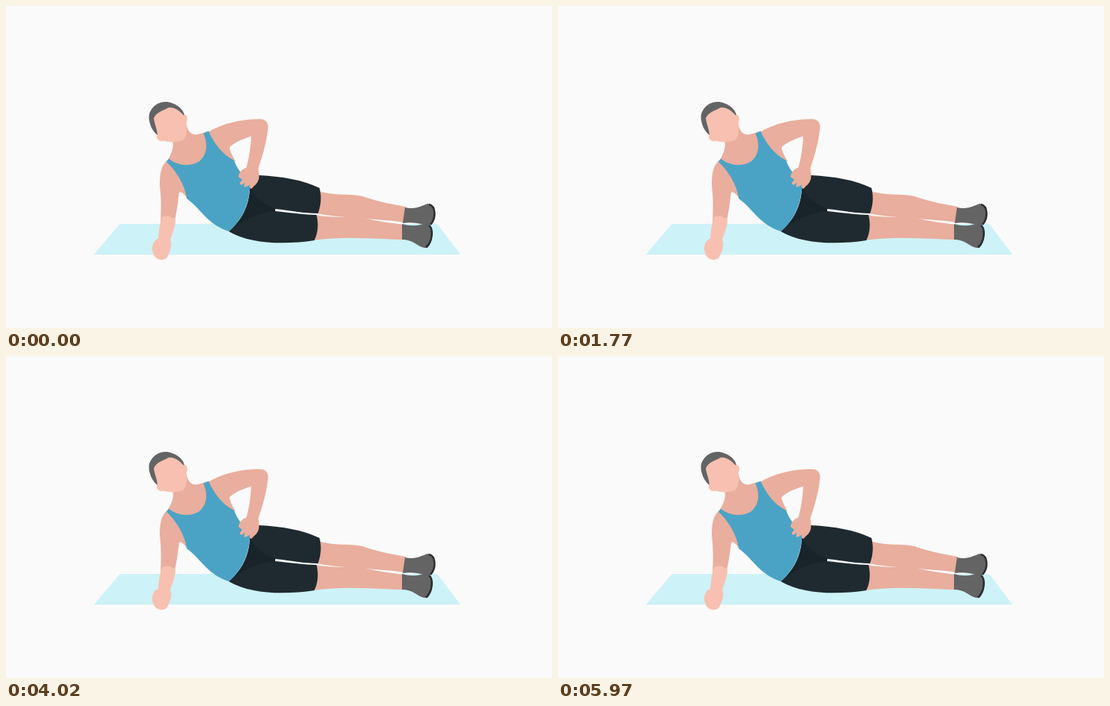
An HTML page for the animation above (6 s loop, 728 by 430 pixels).

```html
<!DOCTYPE html>
<html lang="en">
<head>
<meta charset="utf-8">
<title>Side plank</title>
<style>
html, body { margin: 0; width: 100%; height: 100%; overflow: hidden; background: #fafafa; }
svg { display: block; width: 728px; height: 430px; }
</style>
</head>
<body>
<svg viewBox="0 0 728 430">
  <path fill="#cdf2f7" d="M152,291H575L606,332H117Z"/>
  <g id="body"></g>
  <path fill="#f7c0b0" d="M208,282C214,279 221,281 226,285C226,295 221,305 219,312C222,320 219,327 216,333C214,339 208,340 203,338C198,336 195,330 195,323C196,315 199,312 203,311C204,300 205,290 208,282Z"/>
  <g id="head">
    <path fill="#636465" d="M204,174C194,168 189,153 191,144C196,130 210,125 222,130C231,133 238,140 238,148L220,165Z"/>
    <path fill="#f7c0b0" d="M197,150C200,142 209,140 216,136C224,134 231,140 237,146C242,143 243,152 240,157C242,166 241,175 236,179C226,183 216,182 211,180C205,182 200,178 201,173C204,171 198,158 197,150Z"/>
  </g>
</svg>
<script>
const SKIN = '#e9ae9d', VEST = '#4aa3c5', SHORTS = '#1f2a30', FOLD = '#19232a', SHOE = '#646465', SOLE = '#2b2d30';
const LOOP = 6000, REP = 2030, MOVE = 585, RISE = 100, FALL = 1106;

// Each part: colour, resting outline, raised outline, optional stroke width.
const parts = [
  // legs
  [SKIN,
   'M416,247C440,254 455,250 475,254C495,261 515,265 533,268L531,289C500,284 450,284 414,277Z',
   'M433,221C455,232 470,231 486,238C505,248 523,257 542,265L538,282C505,272 460,263 425,248Z'],
  [SKIN,
   'M412,279C440,284 460,280 480,284C500,288 515,290 530,292L528,312C490,311 450,307 409,313Z',
   'M422,252C450,262 470,262 490,270C508,280 522,284 535,287L530,305C495,298 455,294 416,283Z'],
  // shoes
  [SHOE,
   'M532,269C543,272 552,268 562,264C572,265 574,282 567,292C556,294 548,287 529,290Z',
   'M541,265C552,270 562,268 571,266C583,267 583,284 572,294C560,295 552,285 537,283Z'],
  [SOLE, 'M564,265C573,267 574,283 566,292', 'M574,266C582,269 582,285 572,293', 2.5],
  [SHOE,
   'M528,291C541,295 552,293 560,290C571,291 571,314 562,323C549,324 546,312 528,312Z',
   'M533,286C545,293 555,290 565,291C575,294 573,314 563,323C550,323 548,309 531,305Z'],
  [SOLE, 'M564,293C570,297 569,315 560,322', 'M569,294C573,301 570,315 562,322', 2.5],
  // shorts
  [SHORTS,
   'M297,301C318,284 327,258 325,232L337,226C370,228 395,232 418,243C421,255 420,266 416,277C398,277 378,273 359,271L359,274C380,276 400,279 414,279C417,290 416,304 411,313C372,319 325,318 297,301Z',
   'M308,254C321,238 331,208 331,184L337,183C372,186 404,199 436,217C437,229 433,241 427,249C408,247 390,240 373,234L373,237C390,246 408,251 424,253C426,264 423,277 417,285C378,284 340,272 308,254Z'],
  [FOLD,
   'M325,243Q340,265 359,271L358,274Q325,278 297,301C318,284 327,258 325,243Z',
   'M331,195Q345,222 373,234L372,237Q335,240 308,254C321,238 330,210 331,195Z'],
  // neck and chest
  [SKIN,
   'M222,178C224,188 222,195 216,205L240,225L270,195L268,168C260,170 252,174 247,170C242,166 241,161 240,155Z',
   'M186,195C193,197 203,196 203,211L222,222L242,190L221,154C217,160 215,167 210,168C204,168 199,166 192,158Z'],
  // supporting arm
  [SKIN,
   'M216,205C207,213 205,222 205,240C207,255 207,270 206,290L224,290C228,275 229,262 231,249C234,247 239,253 243,259L245,240L230,210Z',
   'M202,210C200,222 202,235 204,250C206,262 206,272 205,290L224,290C227,275 229,258 229,244C232,239 240,240 252,240L245,230L215,215Z'],
  // bent arm
  [SKIN,
   'M268,169C290,156 315,151 338,151C347,151 351,157 349,166C347,185 341,203 336,218L320,217C324,205 326,190 327,174C314,178 303,183 298,189C299,196 303,201 306,208C290,204 275,186 268,169Z',
   'M220,156C230,137 262,109 288,105C295,103 299,106 303,112C314,130 322,150 330,173L315,177C308,160 298,143 289,128C277,137 266,145 260,153C264,158 270,160 277,164C258,166 238,160 220,156Z'],
  [VEST,
   'M217,204C231,215 249,214 258,207C269,198 269,182 263,170L270,167C277,183 289,199 304,206C308,216 312,224 325,232C327,258 316,286 297,301C268,291 262,273 241,257C239,240 227,220 214,208Z',
   'M203,212C222,213 233,207 236,193C239,180 231,166 218,160L220,154C240,160 258,165 276,163C288,173 306,179 331,184C332,208 322,238 309,254C290,242 272,240 250,240C237,236 222,222 202,218Z'],
  // hand on hip
  [SKIN,
   'M320,216C314,218 311,222 310,228L315,232C311,236 311,238 314,239L319,236C316,241 318,243 321,241L325,239C324,244 327,246 330,241C338,235 339,228 336,216Z',
   'M315,176C310,176 308,178 307,182L317,182C314,190 315,197 317,198L321,191C319,197 322,201 324,200L328,192C327,199 331,199 333,193C341,188 339,181 330,172Z']
];

const body = document.getElementById('body'), head = document.getElementById('head');
const number = /\d+/g;

const shapes = parts.map(([color, low, high, width]) => {
  const path = document.createElementNS('http://www.w3.org/2000/svg', 'path');
  path.setAttribute('fill', width ? 'none' : color);
  if (width) {
    path.setAttribute('stroke', color);
    path.setAttribute('stroke-width', width);
  }
  body.append(path);
  return { path, low, high: high.match(number) };
});

function ease(u) {
  u = Math.min(1, Math.max(0, u));
  return u * u * (3 - 2 * u);
}

function draw() {
  const phase = performance.now() % LOOP % REP;
  const p = ease((phase - RISE) / MOVE) - ease((phase - FALL) / MOVE);
  for (const { path, low, high } of shapes) {
    let i = 0;
    path.setAttribute('d', low.replace(number, n => (+n + (high[i++] - n) * p).toFixed(2)));
  }
  head.setAttribute('transform', `translate(${-37 * p} ${12 * p}) rotate(${-36 * p} 221 164)`);
  requestAnimationFrame(draw);
}
draw();
</script>
</body>
</html>
```
